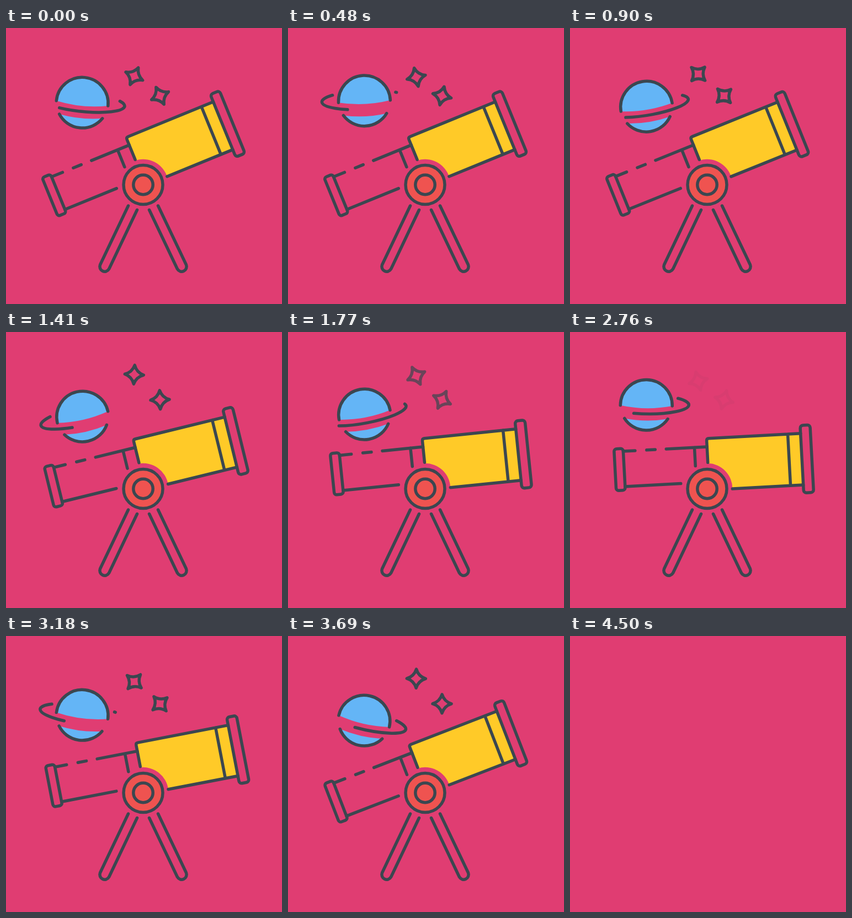
An HTML page for the animation above (4530 ms loop, 500 by 500 pixels).

```html
<!DOCTYPE html>
<html lang="en">
<head>
<meta charset="utf-8">
<title>Telescope</title>
<style>
  html, body { margin: 0; width: 100%; height: 100%; overflow: hidden; background: #e03d72; }
  svg { display: block; width: 100%; height: 100%; }
  #scene { fill: none; stroke: #3b4750; stroke-width: 5.5; stroke-linecap: round; stroke-linejoin: round; }
  .blue { fill: #64b5f6; stroke: none; }
  .yellow { fill: #ffca28; stroke: none; }
  .red { fill: #ef5350; }
</style>
</head>
<body>
<svg viewBox="0 0 500 500">
  <defs>
    <path id="star" d="M0-17Q4-4 17 0Q4 4 0 17Q-4 4-17 0Q-4-4 0-17Z"/>
    <path id="leg" d="M-27 38L-78 145A8.9 8.9 0 0 0-62 152.7L-11 45.5"/>
  </defs>
  <g id="scene">
    <g id="planet">
      <path class="blue" d="M-47 2.4A47 47 0 1 1 47 2.4Q0 12-47 2.4Z"/>
      <path class="blue" d="M-39.2 26A47 47 0 0 0 39.2 26Q0 33-39.2 26Z"/>
      <path d="M-47 2.4A47 47 0 1 1 47 2.4M-39.2 26A47 47 0 0 0 39.2 26"/>
      <path id="ring" stroke-dasharray="135 135" d="M57.2-11.6A77 17.3 0 1 1-57.2-11.6"/>
    </g>
    <g id="stars">
      <use id="star1" href="#star"/>
      <use id="star2" href="#star"/>
    </g>
    <g id="tube">
      <path class="yellow" d="M4-87Q4-91 8-91H174.5V2.5H46A46 46 0 0 0 4-46Z"/>
      <path d="M4-47.5V-87Q4-91 8-91H174.5M46 2.5H174.5M151.3-91V2.5"/>
      <path d="M-148-76H-126.5M-105.5-76H-90M-70-76H4M-18.8-76V-42.5M-148-12H-47"/>
      <rect x="174.5" y="-105.5" width="18" height="122.5" rx="5"/>
      <rect x="-164.5" y="-81" width="16.5" height="75.5" rx="4.5"/>
    </g>
    <g transform="translate(248.5 284)">
      <circle class="red" r="35.5"/>
      <circle r="17.7"/>
      <use href="#leg"/>
      <use href="#leg" transform="scale(-1 1)"/>
    </g>
  </g>
</svg>
<script>
  const LOOP = 4530, CYCLE = 4500;   // the stage is empty between the two
  const LOW = 1455, HALF = 2250;     // planet at its lowest, bob period
  const $ = id => document.getElementById(id);
  const [scene, planet, ring, stars, star1, star2, tube] =
    ['scene', 'planet', 'ring', 'stars', 'star1', 'star2', 'tube'].map($);

  const ramp = (t, start, length) => Math.min(1, Math.max(0, (t - start) / length));
  const ease = u => (1 - Math.cos(Math.PI * u)) / 2;
  const place = (el, x, y, angle) =>
    el.setAttribute('transform', `translate(${x} ${y}) rotate(${angle})`);

  // Rises in two eased steps, falls back in one.
  function tilt(t) {
    const p = (t - LOW + CYCLE) % CYCLE;
    if (p >= HALF) return 13 - 26 * ease((p - HALF) / HALF);
    return -13 + 13 * (ease(ramp(p, 0, HALF / 2)) + ease(ramp(p, HALF / 2, HALF / 2)));
  }

  function draw(t) {
    scene.style.display = t < CYCLE ? '' : 'none';
    const bob = Math.cos((t - LOW) / HALF * 2 * Math.PI);
    const spin = t * 360 / CYCLE;

    place(planet, 138.3, 140.8 + 11.2 * bob, tilt(t));
    ring.setAttribute('stroke-dashoffset', t * 0.3 % 270 - 11);

    place(star1, 232.3, 83.4 - 6.3 * bob, 26 - spin);
    place(star2, 279, 122.8, spin - 25);
    stars.setAttribute('opacity', 1 - ramp(t, 1700, 250) + ramp(t, 2750, 250));

    const swing = ease(ramp(t, 810, 1335)) - ease(ramp(t, 2585, 1300));
    place(tube, 248.3, 284, -22.2 + 20 * swing);
  }

  function tick() {
    draw(performance.now() % LOOP);
    requestAnimationFrame(tick);
  }
  draw(0);
  requestAnimationFrame(tick);
</script>
</body>
</html>
```
